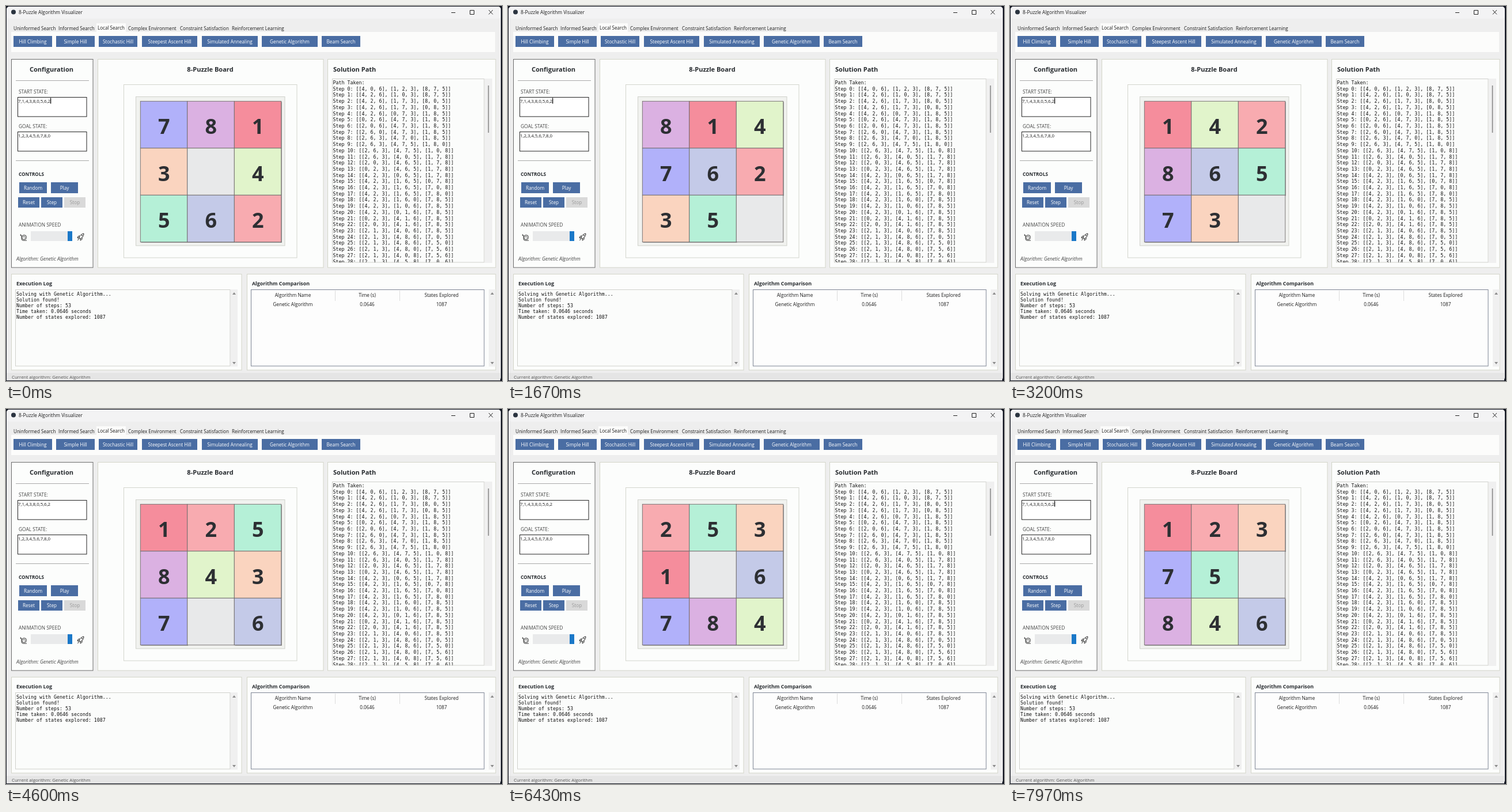
An HTML page for the animation above (8000 ms loop, 861x651 px).

```html
<!DOCTYPE html>
<html lang="en">
<head>
<meta charset="utf-8">
<title>8-Puzzle Algorithm Visualizer</title>
<style>
html, body { margin: 0; width: 100%; height: 100%; overflow: hidden; background: #10141f; }
svg { display: block; width: 861px; height: 651px; }
text { font: 8.2px "Open Sans", "Noto Sans", sans-serif; fill: #1c1c1c; white-space: pre; }
.mono { font: 8.3px "DejaVu Sans Mono", monospace; fill: #111; }
.bold { font-weight: 700; fill: #262a2e; }
.digit { font-size: 36px; font-weight: 700; fill: #2d2f33; }
</style>
</head>
<body>
<svg id="stage" viewBox="0 0 861 651" xmlns="http://www.w3.org/2000/svg"></svg>
<script>
const LOOP = 8000, FIRST = 95, STEP = 201.2;
const TILE = 81.5, LEFT = 233, TOP = 165;
const COLORS = ['#e8e9ea', '#f58d9c', '#f8abb0', '#fad4bf', '#e1f4cb',
                '#b5f0d7', '#c4cae8', '#b1b1fa', '#dbb1e2'];
const SHIFT = { U: -3, D: 3, L: -1, R: 1 };

// Every state reached by walking the empty cell through the moves.
function walk(start, moves) {
  const states = [[...start].map(Number)];
  for (const m of moves) {
    const s = states[states.length - 1].slice();
    const a = s.indexOf(0), b = a + SHIFT[m];
    s[a] = s[b];
    s[b] = 0;
    states.push(s);
  }
  return states;
}

// Rectangle from corner to corner; strokes sit on half pixels.
function box(x0, y0, x1, y1, fill, stroke, extra = '') {
  const o = stroke ? 0.5 : 0;
  return `<rect x="${x0 + o}" y="${y0 + o}" width="${x1 - x0 - o}" height="${y1 - y0 - o}"
    fill="${fill}" stroke="${stroke || 'none'}" ${extra}/>`;
}

function text(x, y, str, { size, cls = '', anchor = 'start', fill, style = '' } = {}) {
  const css = (size ? `font-size:${size}px;` : '') + (fill ? `fill:${fill};` : '') + style;
  return `<text x="${x}" y="${y}" class="${cls}" text-anchor="${anchor}" style="${css}">${str}</text>`;
}

const path = (d, stroke, width = 1, fill = 'none') =>
  `<path d="${d}" stroke="${stroke}" stroke-width="${width}" fill="${fill}"/>`;

const button = (x0, x1, y0, y1, label, bg = '#4a6da3', fg = '#fff') =>
  box(x0, y0, x1, y1, bg) +
  text((x0 + x1) / 2, (y0 + y1) / 2 + 3, label, { anchor: 'middle', fill: fg });

const panel = (x0, y0, x1, y1, edge = '#d3d5c9') => box(x0, y0, x1, y1, '#fcfdfc', edge);

const scrollbar = (x, y0, y1) =>
  box(x - 6, y0, x + 6, y1, '#f0f0f0') +
  path(`M${x - 3} ${y0 + 9}h6l-3-4z`, 'none', 0, '#8b8b8b') +
  path(`M${x - 3} ${y1 - 8}h6l-3 4z`, 'none', 0, '#8b8b8b');

function windowFrame() {
  const tabs = [[13, 'Uninformed Search'], [91, 'Informed Search'], [159, 'Local Search'],
    [212, 'Complex Environment'], [302, 'Constraint Satisfaction'], [392, 'Reinforcement Learning']];
  const algos = [[13, 80, 'Hill Climbing'], [87, 154, 'Simple Hill'], [161, 228, 'Stochastic Hill'],
    [236, 332, 'Steepest Ascent Hill'], [340, 437, 'Simulated Annealing'],
    [444, 541, 'Genetic Algorithm'], [548, 615, 'Beam Search']];
  return box(1, 1, 859, 650, '#eeeeee', '', 'rx="5"') +
    box(1, 1, 859, 22, '#f3f3f4', '', 'rx="5"') +
    '<circle cx="13" cy="10.5" r="4" fill="#2b3440"/>' +
    text(22, 14, '8-Puzzle Algorithm Visualizer', { size: 8.28 }) +
    path('M773 11.5h7M805.5 7.5h7v7h-7zM838 7l7 7.5M845 7l-7 7.5', '#222') +
    box(9, 45, 849, 80, '#fcfcfb') +
    box(157, 30, 208, 46, '#fcfcfb') +
    tabs.map(([x, s], i) => text(x, i == 2 ? 41 : 42, s, { size: 8.1 })).join('') +
    algos.map(([a, b, s]) => button(a, b, 52, 71, s)).join('');
}

function configPanel() {
  const label = (y, s) => text(22, y, s, { size: 8.4, fill: '#444' });
  return panel(9, 92, 151, 454, '#6c6c6c') +
    text(79, 114, 'Configuration', { size: 11.05, cls: 'bold', anchor: 'middle' }) +
    path('M17 129.5h127M17 268.5h127', '#a9a9a9') +
    label(152, 'START STATE:') + box(20, 158, 140, 192, '#fff', '#222') +
    text(21, 167.5, '7,1,4,3,8,0,5,6,2', { size: 7.9 }) +
    '<rect id="caret" x="77" y="159.5" width="1.2" height="10" fill="#000"/>' +
    label(212, 'GOAL STATE:') + box(20, 218, 140, 252, '#fff', '#222') +
    text(21, 227.5, '1,2,3,4,5,6,7,8,0', { size: 7.9 }) +
    text(22, 295, 'CONTROLS', { cls: 'bold' }) +
    button(23, 71, 306, 325, 'Random') + button(78, 125, 306, 325, 'Play') +
    button(21, 58, 332, 350, 'Reset') + button(61, 98, 332, 350, 'Step') +
    button(101, 138, 332, 350, 'Stop', '#d9d9d9', '#9a9a9a') +
    label(383, 'ANIMATION SPEED') +
    box(43, 391, 115, 408, '#e9eaeb') + box(107, 391, 115, 408, '#1a78c8') +
    // snail
    path('M25 396l2 3v5q0 3 3 3h6M24.5 398l2.500 1', '#333') +
    '<circle cx="31.500" cy="401.500" r="4" fill="none" stroke="#333"/>' +
    path('M29.500 402a2 2 0 1 1 2.500 1.500', '#333', 0.8) +
    // rocket
    path('M127 402q2-6 8-7q0 6-6 9zM128 399l-3 1-1 3 3-1M132 402l0 3-3 2 0-3', '#222') +
    path('M127 403l-2.500 4', '#222') + '<circle cx="132" cy="398.500" r="1" fill="#222"/>' +
    text(18, 442, 'Algorithm: Genetic Algorithm', { size: 8.53, fill: '#444', style: 'font-style:italic' });
}

function pathPanel() {
  const states = walk('406123875', 'DDLUURRDDLUULDDRRULLURDDRULD');
  const row = s => '[' + s.join(', ') + ']';
  const show = s => `[${[0, 3, 6].map(i => row(s.slice(i, i + 3))).join(', ')}]`;
  const lines = ['Path Taken:', ...states.map((s, i) => `Step ${i}: ${show(s)}`)];
  return panel(558, 92, 850, 454) +
    text(568, 114, 'Solution Path', { size: 11.05, cls: 'bold' }) +
    box(831, 126, 844, 446, '#f0f0f0') +
    path('M837.500 138v82', '#858585', 1.6) +
    box(566, 126, 830, 445, '#fbfcfb', '#d0d0cc') +
    '<clipPath id="clip"><rect x="567" y="127" width="263" height="318"/></clipPath>' +
    `<g clip-path="url(#clip)">${lines.map((s, i) =>
      text(567.5, 136 + i * 10.71, s, { cls: 'mono' })).join('')}</g>`;
}

function logPanel() {
  const lines = ['Solving with Genetic Algorithm...', 'Solution found!', 'Number of steps: 53',
    'Time taken: 0.0646 seconds', 'Number of states explored: 1087'];
  return panel(9, 465, 409, 632) +
    text(18, 485, 'Execution Log', { size: 9, cls: 'bold' }) +
    box(16, 492, 389, 625, '#fbfcfb', '#d0d0cc') + scrollbar(396, 492, 626) +
    lines.map((s, i) => text(18, 502.5 + i * 10, s, { cls: 'mono' })).join('');
}

function tablePanel() {
  const cells = [[498, 'Algorithm Name', 'Genetic Algorithm'], [627, 'Time (s)', '0.0646'],
    [756, 'States Explored', '1087']];
  return panel(418, 465, 850, 632) +
    text(427, 485, 'Algorithm Comparison', { size: 8.9, cls: 'bold' }) +
    box(425, 492, 830, 625, '#fdfdfd', '#7d8494') + scrollbar(844, 492, 626) +
    path('M571.500 494v18M683.500 494v18', '#dcdcdc') +
    cells.map(([x, head, value]) => text(x, 505, head, { anchor: 'middle' }) +
      text(x, 520.5, value, { anchor: 'middle' })).join('');
}

function board(state) {
  return state.map((n, i) => {
    const x = LEFT + (i % 3) * TILE, y = TOP + Math.floor(i / 3) * TILE;
    const rect = (d, fill, stroke) => `<rect x="${x + d}" y="${y + d}" width="${TILE}"
      height="${TILE}" fill="${fill}" stroke="${stroke}" stroke-width="0.9"/>`;
    return (n ? rect(1.5, '#9b9b9b', 'none') : '') + rect(0.3, COLORS[n], '#6f6a6a') +
      (n ? text(x + TILE / 2 + 0.5, y + 57, n, { cls: 'digit', anchor: 'middle' }) : '');
  }).join('');
}

document.getElementById('stage').innerHTML =
  windowFrame() + configPanel() +
  panel(159, 92, 551, 454) +
  text(354.5, 114, '8-Puzzle Board', { size: 11.05, cls: 'bold', anchor: 'middle' }) +
  box(204, 136, 505, 437, '#fcfdfc', '#d3d5cd') +
  box(225, 157, 484, 416, '#f1f2ef', '#cfd1ca') +
  '<g id="board"></g>' +
  pathPanel() + logPanel() + tablePanel() +
  box(1, 637, 858, 650, '#e5e5e5') +
  text(10, 647, 'Current algorithm: Genetic Algorithm', { size: 7.92, fill: '#555' });

const states = walk('781304562', 'DLUURRDDLLUURRDDLUURDDLULURRDDLUULDDRRU');
const boardEl = document.getElementById('board'), caret = document.getElementById('caret');
let shown = -1;

function draw() {
  const t = performance.now() % LOOP;
  const step = Math.min(states.length - 1, Math.max(0, Math.floor((t - FIRST) / STEP) + 1));
  if (step !== shown) boardEl.innerHTML = board(states[shown = step]);
  const blink = t - 34;
  caret.style.opacity = blink >= 0 && blink % 912 < 304 ? 0 : 1;
  requestAnimationFrame(draw);
}
draw();
</script>
</body>
</html>
```
